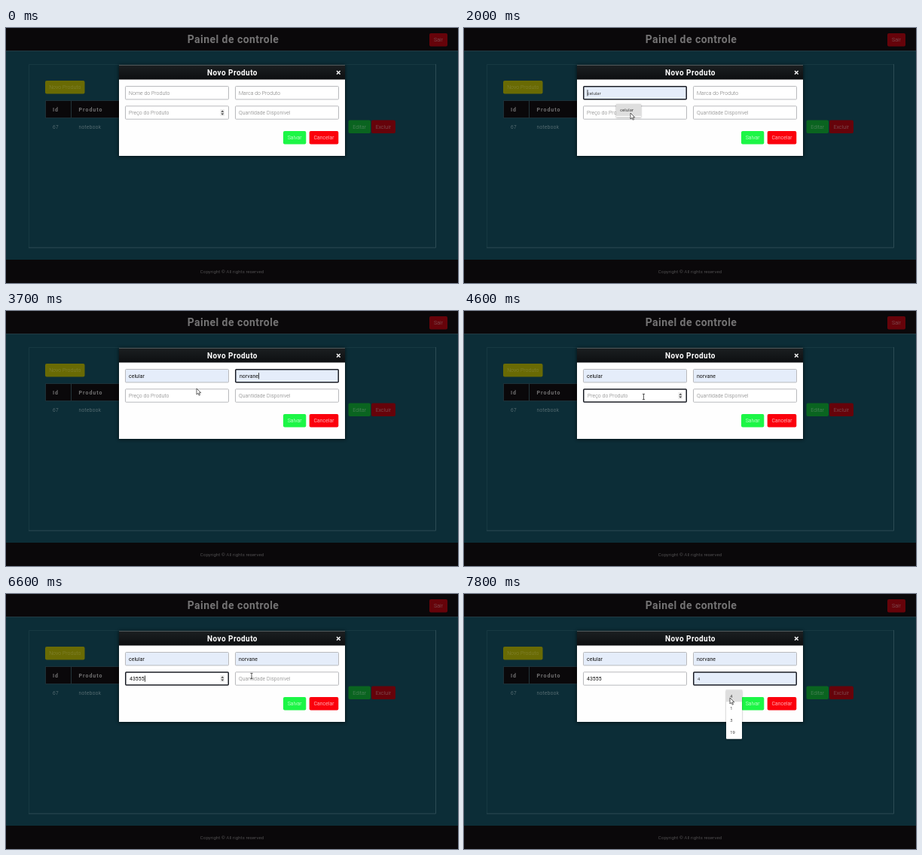
Recreate the animation shown at these times as an HTML page. Size 600 by 339 pixels, loop 8 s.

```html
<!DOCTYPE html>
<html lang="pt">
<head>
<meta charset="utf-8">
<title>Painel de controle</title>
<style>
  html, body { margin: 0; width: 100%; height: 100%; overflow: hidden; background: #0a080a; }
  svg { display: block; width: 100vw; height: 100vh; }
  text { font: 300 6.9px Roboto, Inter, sans-serif; letter-spacing: .06px; white-space: pre; }
  .mid { text-anchor: middle; }
  .title { font-size: 14px; font-weight: 600; letter-spacing: .45px; fill: #747374; }
  .head { font-size: 10px; font-weight: 700; letter-spacing: .45px; fill: #fff; }
  .th { font-size: 7px; font-weight: 700; letter-spacing: 1px; fill: #727172; }
  .td { font-size: 6.5px; letter-spacing: .4px; fill: #75868a; }
  .foot { font-size: 6px; letter-spacing: .14px; fill: #6f6e6f; }
  .hint { fill: #757575; }
  .value { fill: #111; font-weight: 400; }
  .small { font: 400 5.6px "Open Sans", "Noto Sans", sans-serif; fill: #222; }
</style>
</head>
<body>
<svg viewBox="0 0 600 339" preserveAspectRatio="none">
  <defs>
    <linearGradient id="bar" x2="0" y2="1">
      <stop stop-color="#1b1f21"/><stop offset="1" stop-color="#0d0f11"/>
    </linearGradient>
    <filter id="glow" x="-10%" y="-20%" width="120%" height="140%"><feGaussianBlur stdDeviation="2"/></filter>
    <filter id="soft" x="-30%" y="-30%" width="160%" height="160%"><feGaussianBlur stdDeviation="1.2"/></filter>
  </defs>

  <rect width="600" height="339" fill="#0a080a"/>
  <rect y="30" width="600" height="278" fill="#0c2d37"/>
  <rect y="30" width="600" height="1" fill="#213a42"/>
  <text class="title mid" x="301.5" y="20">Painel de controle</text>
  <text class="foot mid" x="300" y="326">Copyright © All rights reserved</text>

  <path d="M30.5 292V48.5H570" fill="none" stroke="#173942"/>
  <path d="M570.5 48V292H30" fill="none" stroke="#2c4b54"/>

  <rect x="52.5" y="96.5" width="300" height="23" fill="#0a080a" stroke="#1c3139"/>
  <path d="M86.5 97V119" stroke="#22343a"/>
  <text class="th" x="62" y="111">Id</text>
  <text class="th" x="96.5" y="111">Produto</text>
  <text class="td" x="62" y="133.7">67</text>
  <text class="td" x="96.5" y="133.7">notebook</text>
  <g id="back"></g>

  <rect x="149.5" y="49" width="301" height="122" fill="#000" opacity=".6" filter="url(#glow)"/>
  <rect x="150" y="49.5" width="300" height="120.5" fill="#fefefe"/>
  <rect x="150" y="49.5" width="300" height="19" fill="url(#bar)"/>
  <text class="head mid" x="300.5" y="63">Novo Produto</text>
  <path d="M439 57l4.6 4.6m0-4.6l-4.6 4.6" stroke="#fff" stroke-width="1.4"/>
  <g id="front"></g>
  <g id="form"></g>
</svg>

<script>
const LOOP = 8000, STEP = 100, BLINK = 500, KEY = 200;
const W = 138, H = 18.4, ROW = 16;
const $ = id => document.getElementById(id);

// Times in ms: click focuses, open shows the menu, hover previews, pick fills in.
const fields = [
  { hint: 'Nome do Produto', options: ['celular'], menu: 33, click: 500, open: 1600, hover: 1800, pick: 2100 },
  { hint: 'Marca do Produto', options: ['norvane', 'taveluma'], menu: 42, click: 2800, open: 2900, hover: 3200, pick: 3700 },
  { hint: 'Preço do Produto', typed: '43555', click: 4100, type: 5700 },
  { hint: 'Quantidade Disponivel', options: ['4', '1', '3', '19'], menu: 21, click: 7000, open: 7000, hover: 7600, pick: LOOP }
];
fields.forEach((f, i) => {
  f.x = 158 + 146 * (i % 2);
  f.y = 77 + 26.3 * (i >> 1);
  f.menuBox = [f.x + 44, f.y + H + 5.6, f.menu, f.options ? f.options.length * ROW + 1.5 : 0];
});

const home = { x: 228, y: 110 };
const moves = [
  { from: 100, to: 300, x: 218, y: 88 },
  { from: 1500, to: 1900, x: 221, y: 113 },
  { from: 2300, to: 2600, x: 343, y: 96.5 },
  { from: 2900, to: 3400, x: 364, y: 111 },
  { from: 3600, to: 3700, x: 253, y: 103 },
  { from: 4000, to: 4600, x: 238.5, y: 114 },
  { from: 6300, to: 6600, x: 326, y: 109 },
  { from: 7200, to: 7700, x: 353, y: 138 }
];

const smooth = k => k * k * (3 - 2 * k);
const clamp = k => Math.min(1, Math.max(0, k));
const inside = (p, [x, y, w, h]) => p.x >= x && p.x <= x + w && p.y >= y && p.y <= y + h;
const menuOpen = (f, t) => f.open <= t && t < f.pick;

function pointerAt(t) {
  return moves.reduce((p, m) => {
    const k = smooth(clamp((t - m.from) / (m.to - m.from)));
    return { x: p.x + (m.x - p.x) * k, y: p.y + (m.y - p.y) * k };
  }, home);
}

function contentAt(f, t) {
  if (f.typed) return { value: f.typed.slice(0, Math.max(0, Math.floor((t - f.type) / KEY) + 1)) };
  if (t < f.hover) return { value: '' };
  return { value: f.options[0], filled: true, preview: t < f.pick };
}

// The caret restarts its blink at every action in the field.
function caretOn(f, t) {
  const keys = [...(f.typed || '')].map((_, i) => f.type + i * KEY);
  const base = Math.max(...[f.click, f.open, f.pick, ...keys].filter(a => a <= t));
  return Math.floor((t - base) / BLINK) % 2 === 0;
}

function rect(x, y, w, h, fill, more = '') {
  return `<rect x="${x}" y="${y}" width="${w}" height="${h}" fill="${fill}" ${more}/>`;
}
function label(x, y, str, cls, more = '') {
  return `<text x="${x}" y="${y}" class="${cls}" ${more}>${str}</text>`;
}
function button(x, y, w, fill, str, ink) {
  return rect(x, y, w, 17.5, fill, 'rx="2"') + label(x + w / 2, y + 11.2, str, 'mid', `fill="${ink}"`);
}

$('back').innerHTML =
  button(562, 7, 24, '#66030a', 'Sair', '#85666a') +
  button(52, 70, 52.5, '#696a04', 'Novo Produto', '#868636') +
  button(454.5, 122.5, 29.5, '#0a6420', 'Editar', '#5f8a68') +
  button(485, 122.5, 32, '#66030a', 'Excluir', '#85666a');
$('front').innerHTML =
  button(368, 137, 30.3, '#1cf646', 'Salvar', '#fff') +
  button(402.7, 137, 38.6, '#fb000c', 'Cancelar', '#fff');

const pen = document.createElement('canvas').getContext('2d');
function textWidth(str) {
  pen.font = '400 69px Roboto, Inter, sans-serif';
  return pen.measureText(str).width / 10;
}

function drawField(f, focused, t) {
  const { value, filled, preview } = contentAt(f, t);
  const line = focused ? 1.5 : 1;
  const tx = f.x + (focused ? 6 : 5), ty = f.y + H / 2 + 2.6;
  const style = value ? (preview ? 'small' : 'value') : 'hint';
  let out = rect(f.x + line / 2, f.y + line / 2, W - line, H - line, filled ? '#e5edfa' : '#fff',
    `rx="1" stroke="${focused ? '#1b1e26' : '#b9babd'}" stroke-width="${line}"`);
  out += label(tx, ty, value || f.hint, style);
  if (focused && caretOn(f, t)) {
    const end = style === 'value' ? textWidth(value) + .6 : -.4;
    out += rect(tx + end, f.y + 5.2, .8, 8.2, '#111');
  }
  return out;
}

function drawSpinner() {
  return rect(284.5, 108, 5.5, 9, '#ececec') +
    '<path d="M285.3 111.8l2-2.4 2 2.4zM285.3 113.4l2 2.4 2-2.4z" fill="#444"/>';
}

function drawMenu(f, t) {
  const [x, y, w, h] = f.menuBox;
  let out = rect(x, y + .8, w, h, '#000', 'opacity=".35" filter="url(#soft)"') +
    rect(x, y, w, h, '#fff', 'rx="1"');
  if (t >= f.hover) out += rect(x, y, w, ROW, '#dedede');
  return out + f.options.map((str, i) => label(x + 5.3, y + ROW * i + 10.3, str, 'small')).join('');
}

function drawPointer(p, beam) {
  const art = beam
    ? '<path d="M-1.6-3.6H1.6M0-3.6V3.6M-1.6 3.6H1.6" stroke="#333" stroke-width=".8" fill="none"/>'
    : '<path d="M0 0V8L1.9 6.3 3.2 9.2 4.5 8.6 3.2 5.8H5.8Z" fill="#fff" stroke="#222" stroke-width=".7"/>';
  return `<g transform="translate(${p.x} ${p.y})">${art}</g>`;
}

function draw(t) {
  const p = pointerAt(t);
  const active = fields.filter(f => f.click <= t).pop();
  const menu = fields.find(f => menuOpen(f, t));
  const overMenu = menu && inside(p, menu.menuBox);
  const over = overMenu ? null : fields.find(f => inside(p, [f.x, f.y, W, H]));

  let out = fields.map(f => drawField(f, f === active, t)).join('');
  if ([active, over].some(f => f && f.typed)) out += drawSpinner();
  if (menu) out += drawMenu(menu, t);
  if (t >= moves[0].from) out += drawPointer(p, over);
  $('form').innerHTML = out;
}

let shown = -1;
const start = performance.now();
function tick() {
  const t = Math.floor(((performance.now() - start) % LOOP) / STEP) * STEP;
  if (t !== shown) draw(shown = t);
  requestAnimationFrame(tick);
}
tick();
</script>
</body>
</html>
```
